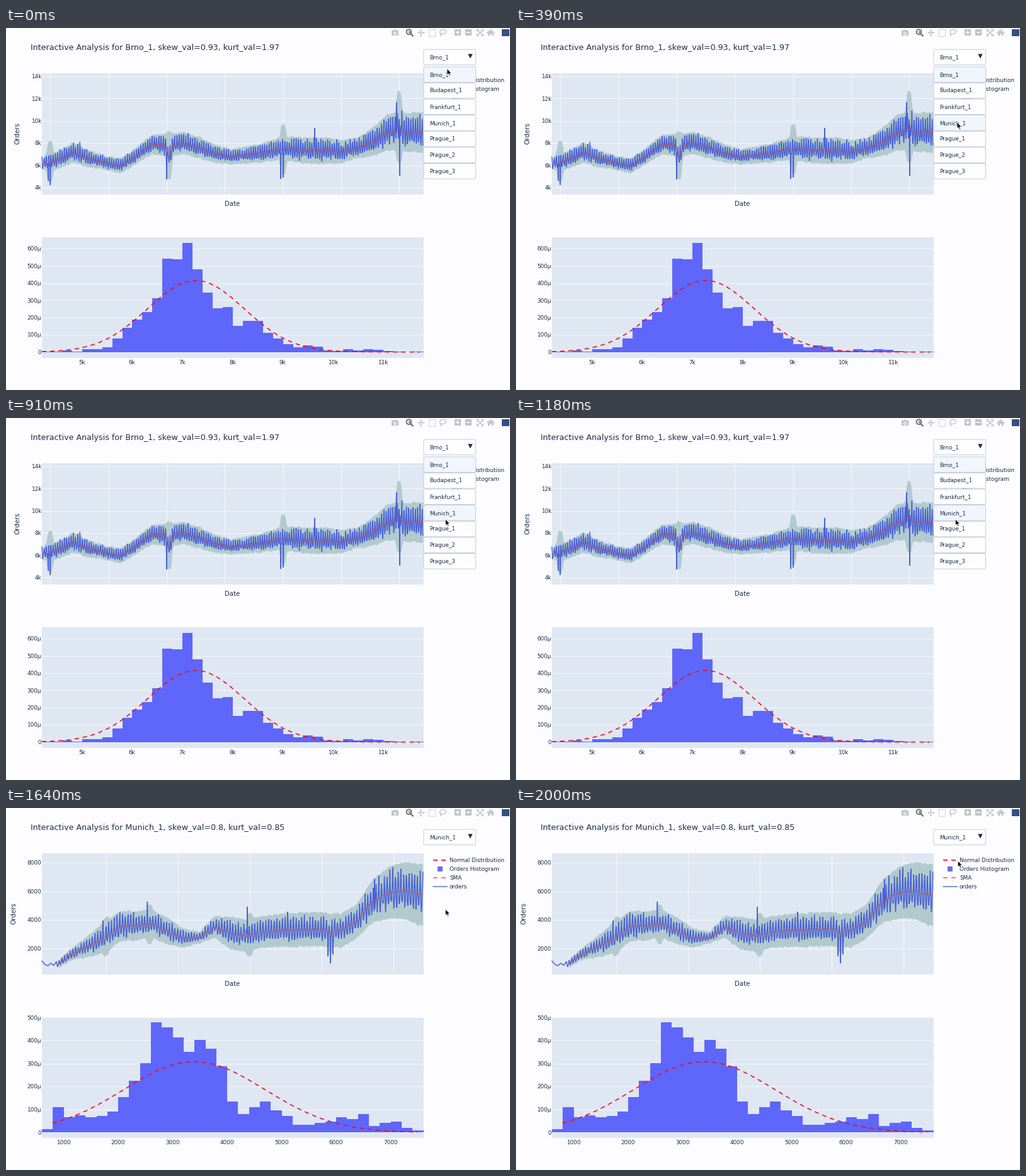
Recreate the animation shown at these times as a matplotlib script. Size 800 by 576 pixels, loop 2.03 s.

```python
import numpy as np
import matplotlib.pyplot as plt
from matplotlib.animation import FuncAnimation
from matplotlib.patches import Circle, Ellipse, FancyBboxPatch, Polygon, Rectangle

W, H, DPI = 800, 576, 100
FRAMES, STEP = 70, 29
PX = 72 / DPI

PAPER, PLOT, GRID = "#fdfcfe", "#dfe7f2", "#f7fafd"
INK, BLUE, BAND = "#1f2f4c", "#4860d8", "#b2cace"
BAR, RED, SMA = "#5f66fa", "#f5081c", "#d9482f"
BORDER, ICON, ICON_ON = "#bec8d9", "#c0c2c8", "#6c7078"
LEFT, RIGHT = 57, 662.5
DASH = (7, 6)

plt.rcParams["font.family"] = "DejaVu Sans"
fig = plt.figure(figsize=(W / DPI, H / DPI), dpi=DPI, facecolor=PAPER)
ax = fig.add_axes([0, 0, 1, 1])
ax.set_xlim(0, W)
ax.set_ylim(H, 0)
ax.axis("off")


def text(x, y, s, size=8.85, ha="left", z=5):
    return ax.text(x, y + 0.365 * size, s, fontsize=size * PX, color=INK,
                   ha=ha, va="baseline", zorder=z)


def line(x, y, color, width, z=3, dash=None):
    style = (0, (dash[0] / width, dash[1] / width)) if dash else "-"
    ax.plot(x, y, color=color, lw=width * PX, ls=style, zorder=z,
            dash_capstyle="butt", solid_joinstyle="bevel")


def grid_row(y, width=0.9):
    line([LEFT, RIGHT], [y, y], GRID, width, 1.5)


def shape(patch, z=3):
    ax.add_patch(patch).set_zorder(z)


def rect(x0, y0, x1, y1, color, z=1):
    shape(Rectangle((x0, y0), x1 - x0, y1 - y0, fc=color, lw=0), z)


def mark(x, y, kind, size, color=ICON, edge=0):
    ax.plot([x], [y], kind, ms=size * PX, mfc=color, mec=color, mew=edge * PX, zorder=3)


def box(y, z):
    return ax.add_patch(FancyBboxPatch(
        (664, y + 1), 80.5, 22.5, boxstyle="round,pad=1,rounding_size=1.8",
        fc="white", ec=BORDER, lw=0.9 * PX, zorder=z))


def spread_over(values, x):
    """Interpolate values spaced evenly along the chart."""
    return np.interp(x, np.linspace(LEFT, 657, len(values)), values)


def smooth(v, n=5):
    return np.convolve(v, np.ones(n) / n, "valid")


# Weekly rhythm around the trend, in units of the band's half width
WEEK = np.array([0.85, 0.25, -0.35, -0.62, -0.45, -0.1, 0.4])


def orders(trend, spread, jolts, spikes, start, rate, gain, seed):
    rng = np.random.default_rng(seed)
    x = np.arange(start, RIGHT, 1 / rate)
    day = np.arange(len(x))
    mid, half = spread_over(trend, x), spread_over(spread, x)
    swing = gain * half
    for cx, shift, extra in jolts:
        bump = np.exp(-((x - cx) / 5) ** 4)
        mid, half = mid + shift * bump, half + extra * bump
    strength = rng.uniform(0.75, 1.08, len(x) // 7 + 1)[day // 7]
    y = mid - swing * (WEEK[day % 7] * strength + rng.normal(0, 0.1, len(x)))
    for sx, sy in spikes:
        y[np.abs(x - sx).argmin()] = sy
    return x, y, mid + smooth(rng.normal(0, 1.6, len(x) + 4)), half


def top_chart(series, lead, y_ticks, grid_x):
    for gx in grid_x:
        line([gx, gx], [71.5, 264.5], GRID, 0.9, 1.5)
    for gy, label in y_ticks:
        grid_row(gy)
        text(56, gy, label, ha="right")
    x, y, mid, half = (s[8:] for s in series)
    ax.fill_between(x, mid - half, mid + half, fc=BAND, lw=0, zorder=2)
    line([*lead[0], *series[0]], [*lead[1], *series[1]], BLUE, 1.45)
    line(x, mid, SMA, 1.25, 4, (5, 3))


def histogram(heights, zero, unit, rows, x0, k, labels, mean, sigma, last):
    for i in range(rows + 1):
        gy = zero - i * unit
        grid_row(gy, 0.9 if i else 1.5)
        text(56, gy, f"{i}00µ" if i else "0", ha="right")
    for i, s in enumerate(labels):
        text(x0 + i * k, 531.5, s, ha="center")
    edges = np.minimum(LEFT + np.arange(len(heights) + 1) * k / 5, RIGHT)
    ax.stairs(zero - np.array(heights), edges, baseline=zero, fill=True,
              color=BAR, lw=0, zorder=2)
    # the fitted curve begins at the smallest order count
    cx = np.linspace(*last, 200)
    peak = unit * 1e4 / (sigma * np.sqrt(2 * np.pi))
    z = (cx - mean) * 1000 / (k * sigma)
    line(cx, zero - peak * np.exp(-z ** 2 / 2), RED, 1.6, 4, DASH)


def captions(name, stats, label_x):
    text(39, 30.5, f"Interactive Analysis for {name}, {stats}", 12.68)
    ax.text(label_x, 168, "Orders", fontsize=10.25 * PX, color=INK,
            rotation=90, ha="center", va="center")
    text(672, 46, name, z=11)


def brno_view():
    trend = [216, 210, 198, 208, 214, 219, 203, 185, 187, 183, 191, 200, 205,
             202, 199, 193, 193, 195, 195, 197, 191, 181, 165, 166, 166]
    spread = [12, 16, 11, 13, 18, 17, 12, 15, 20, 21, 16, 29, 32]
    jolts = [(70, 0, 20), (259, 16, 20), (440, 0, 22), (624, -8, 27)]
    spikes = [(67, 243), (70.5, 250), (117, 181), (255, 241), (436, 240),
              (440, 238), (490, 159), (620, 118), (625, 235)]
    captions("Brno_1", "skew_val=0.93, kurt_val=1.97", 18)
    top_chart(orders(trend, spread, jolts, spikes, LEFT, 1.96, 1, 4), ([], []),
              [(77 + 35.4 * i, f"{14 - 2 * i}k") for i in range(6)],
              70.2 + 92.35 * np.arange(7))
    heights = [1, 1, 3, 1, 5, 5, 8, 22, 39, 52, 64, 86, 149, 148, 174, 132, 95, 70, 72,
               42, 50, 50, 31, 22, 13, 8, 11, 9, 3, 2, 5, 3, 5, 4, 2, 1, 0, 1]
    histogram(heights, 515.6, 27.42, 6, 120.5, 79.7,
              [f"{i}k" for i in range(5, 12)], 301.4, 961, (LEFT, 657))


def munich_view():
    trend = [250, 249, 231, 219, 206, 188, 187, 184, 196, 207, 206, 189, 200,
             203, 197, 195, 194, 193, 193, 195, 180, 148, 135, 131, 138]
    spread = [2, 10, 25, 23, 21, 9, 26, 25, 27, 27, 27, 41, 49]
    jolts = [(159, 0, 6), (228, 0, 9), (387, 0, 9), (515, 6, 4)]
    spikes = [(154, 179), (224.5, 149), (383, 157), (447, 165), (511, 236),
              (515, 247), (518.5, 233), (585, 113), (609.5, 98)]
    captions("Munich_1", "skew_val=0.8, kurt_val=0.85", 12)
    top_chart(orders(trend, spread, jolts, spikes, 80, 1.6, 0.88, 9),
              ([57, 62, 66.5, 71, 76], [243.5, 249, 251, 247, 250.5]),
              [(87 + 45.6 * i, str(8000 - 2000 * i)) for i in range(4)],
              159.4 + 114 * np.arange(5))
    heights = [5, 40, 24, 27, 24, 26, 33, 56, 82, 110, 175, 167, 151, 128, 147, 133,
               105, 49, 29, 40, 49, 35, 26, 12, 12, 15, 17, 24, 21, 29, 10, 15, 17, 7, 3]
    histogram(heights, 516.4, 36.6, 5, 91.5, 86.5,
              [str(i * 1000) for i in range(1, 8)], 299, 1295, (74, 653))


def drawn_by(draw):
    before = set(ax.get_children())
    draw()
    return list(set(ax.get_children()) - before)


def toolbar():
    y = 7.3
    # camera
    rect(611.5, 4.2, 623, 12.2, ICON)
    rect(614.5, 2.6, 620, 5, ICON)
    mark(617.2, 8, "o", 5, PAPER)
    mark(617.2, 8, "o", 2.6)
    # zoom
    shape(Circle((639.5, 6.2), 3.9, fc="none", ec=ICON_ON, lw=1.9 * PX))
    line([642.4, 645.6], [9.3, 12.5], ICON_ON, 2.3)
    mark(639.5, 6.2, "+", 4, ICON_ON, 1.2)
    # pan
    mark(658, y, "+", 9, ICON, 1.2)
    for kind, dx, dy in ((">", 1, 0), ("<", -1, 0), ("v", 0, 1), ("^", 0, -1)):
        mark(658 + 4.5 * dx, y + 4.5 * dy, kind, 3.4)
    # box and lasso select
    ax.add_patch(Rectangle((670.5, 2.3), 10.5, 10.4, fc="none", ec=ICON,
                           lw=1.2 * PX, ls=(0, (1.6, 1.1))))
    shape(Ellipse((693.5, 6), 10, 7, angle=-15, fc="none", ec=ICON, lw=1.3 * PX))
    line([689.8, 689, 690.6, 690], [8.6, 10, 11, 13], ICON, 1.2)
    # zoom in, zoom out
    for cx, kind in ((716.7, "+"), (734.2, "_")):
        mark(cx, y, "s", 10.6)
        mark(cx, y, kind, 6, PAPER, 1.7)
    # autoscale
    a = np.array([2, 5, 5])
    mark(751.8, y, "x", 7.5, ICON, 1.3)
    for sx in (-1, 1):
        for sy in (-1, 1):
            line(751.8 + sx * a, y + sy * a[::-1], ICON, 1.2)
    # home
    line([763.5, 769.3, 775.1], [7.8, 2.8, 7.8], ICON, 1.4)
    shape(Polygon([(765, 8), (769.3, 4.4), (773.6, 8), (773.6, 12.2), (765, 12.2)],
                  fc=ICON, lw=0))
    rect(768, 9.2, 770.6, 12.4, PAPER, 4)
    rect(786.5, 1.5, 798.5, 13, "#34507f")


def legend():
    rows = [("Normal Distribution", RED, 1.7, DASH), ("Orders Histogram", None, 0, None),
            ("SMA", "#f0554a", 1.5, DASH), ("orders", "#5570e0", 1.5, None)]
    for i, (label, color, width, dash) in enumerate(rows):
        y = 82.9 + 13.9 * i
        text(704, y + 0.2, label)
        if color:
            line([678, 700], [y, y], color, width, dash=dash)
        else:
            mark(689.3, y, "s", 8.7, "#6c6cf0")


rect(LEFT, 71.5, RIGHT, 264.5, PLOT)
rect(LEFT, 332.5, RIGHT, 524.5, PLOT)
text(359.5, 279.5, "Date", 10.1, "center")
toolbar()
legend()
box(34.2, 10)
shape(Polygon([(733.3, 41.3), (740.7, 41.3), (737, 48.6)], fc=INK, lw=0), 11)
brno, munich = drawn_by(brno_view), drawn_by(munich_view)

CITIES = ("Brno_1", "Budapest_1", "Frankfurt_1", "Munich_1", "Prague_1", "Prague_2", "Prague_3")
ROW, TOP = 25.63, 61.8
items = [(box(TOP + ROW * i, 12), text(672, 73.6 + ROW * i, s, z=13))
         for i, s in enumerate(CITIES)]

ARROW = np.array([(0, 0), (0, 10.4), (2.4, 8.2), (4, 11.8), (5.7, 11), (4.2, 7.6), (7.3, 7.4)])
cursor = ax.add_patch(Polygon(ARROW, fc="#0a0a0c", ec="white", lw=0.8 * PX, zorder=20))

CLICK, FADE = 1175, 250
# time, x and y of the pointer
PATH = np.array([(0, 700, 64.5), (180, 704.3, 101), (300, 702, 136), (400, 699.5, 154),
                 (580, 698.3, 159.5), (910, 697.3, 160.7), (1690, 697.3, 160.7),
                 (1780, 698, 148), (1900, 700, 108), (2000, 701.2, 84), (2030, 701, 76)]).T


def ease(p):
    p = min(max(p, 0), 1)
    return 4 * p ** 3 if p < 0.5 else 1 - 4 * (1 - p) ** 3


def update(i):
    t = i * STEP
    x, y = (np.interp(t, PATH[0], p) for p in PATH[1:])
    cursor.set_xy(ARROW + (x, y))

    picked = t >= CLICK
    for a in brno:
        a.set_visible(not picked)
    for a in munich:
        a.set_visible(picked)

    alpha = 1 - ease((t - CLICK) / FADE)
    hover = int((y - TOP) // ROW)
    for k, (frame, label) in enumerate(items):
        frame.set_facecolor("#f0f6fc" if k in (0, hover) else "#fefefe")
        for a in (frame, label):
            a.set_alpha(alpha)
            a.set_visible(alpha > 0)
    return []


anim = FuncAnimation(fig, update, frames=FRAMES, interval=STEP, repeat=True,
                     repeat_delay=0, blit=False)
plt.show()
```
